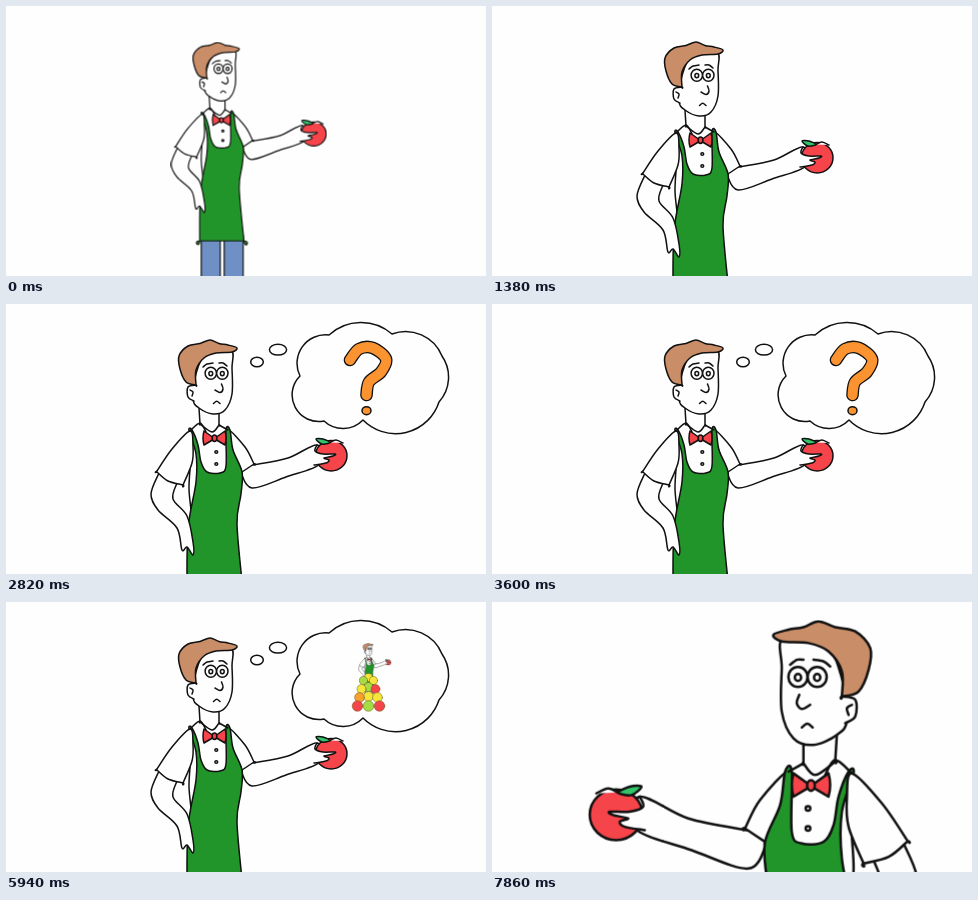
An HTML page for the animation above (8 s loop, 480 px wide and 270 px high).

```html
<!DOCTYPE html>
<html lang="en">
<head>
<meta charset="utf-8">
<title>Grocer thinking</title>
<style>
  html, body { margin: 0; width: 100%; height: 100%; overflow: hidden; background: #fdfefd; }
  svg { display: block; width: 100vw; height: 100vh; }
  #zoom { animation: zoom 8s infinite; }
  #wide { animation: hide 8s step-end infinite; }
  #close { animation: reveal 8s step-end infinite; }

  @keyframes zoom {
    0% { transform: translate(50.6px, 7.9px) scale(.7905); animation-timing-function: cubic-bezier(.3, .3, .5, 1); }
    8.75%, 100% { transform: translate(0px, 0px) scale(1); }
  }
  @keyframes hide { 0% { opacity: 1 } 91.5%, 100% { opacity: 0 } }
  @keyframes reveal { 0% { opacity: 0 } 91.5%, 100% { opacity: 1 } }
</style>
</head>
<body>
<svg viewBox="0 0 480 270" stroke="#111" stroke-width="1.5" stroke-linecap="round" stroke-linejoin="round" fill="none">
  <defs><g id="man"></g></defs>
  <g id="wide">
    <g id="zoom"><use href="#man"/></g>
    <g id="thought"></g>
  </g>
  <g id="close"><use href="#man" transform="matrix(-1.67 0 0 1.67 667.2 -40.8)"/></g>
</svg>
<script>
const LOOP = 8000;
const WHITE = '#fdfefd', GREEN = '#22952a', RED = '#f5444a', HAIR = '#c98d68', JEANS = '#6f90c4';
const ORANGE = '#fb9430', LEAF = '#35c46a';

function add(parent, tag, attrs = {}) {
  const el = document.createElementNS('http://www.w3.org/2000/svg', tag);
  for (const k in attrs) el.setAttribute(k, attrs[k]);
  return parent.appendChild(el);
}

// Smooth curve through "x,y x,y ..."; a doubled point makes a corner.
function curve(text, closed) {
  const p = text.trim().split(/\s+/).map(s => s.split(',').map(Number));
  const n = p.length;
  const at = i => closed ? p[(i + n) % n] : p[Math.max(0, Math.min(n - 1, i))];
  let d = 'M' + p[0];
  for (let i = 0; i < (closed ? n : n - 1); i++) {
    const [a, b, c, e] = [at(i - 1), at(i), at(i + 1), at(i + 2)];
    const c1 = b.map((v, k) => v + (c[k] - a[k]) / 6);
    const c2 = c.map((v, k) => v - (e[k] - b[k]) / 6);
    d += `C${c1} ${c2} ${c}`;
  }
  return d + (closed ? 'Z' : '');
}

const man = document.getElementById('man');
const shape = (pts, fill, more) => add(man, 'path', { d: curve(pts, true), fill, ...more });
const line = (pts, fill = 'none', more) => add(man, 'path', { d: curve(pts), fill, ...more });
const oval = (cx, cy, rx, ry, fill, to = man) => add(to, 'ellipse', { cx, cy, rx, ry, fill });

function drawBody() {
  for (const x of [183, 212])
    add(man, 'path', { d: `M${x} 280 V340 h24 V280`, fill: JEANS });

  add(man, 'path', { d: 'M184 127 L194 119 H213 L222 126 L232 190 L184 205Z', fill: WHITE, stroke: 'none' });
  line('184,165 183,185 185,206');

  // Holding arm and its sleeve
  line('247,161 282,154 311,141 314,160 280,173 246,184 235,169', WHITE);
  shape('222,126 239,143 248,160 248,160 236,168 236,168 228,150', WHITE);

  // Apron
  shape(`183,127 186,126 192,141 195,158 201,168 214,169 220,162 220,126 224,126 227,146 236,168
    235,190 231,220 237,287 237,287 181,287 181,287 182,225 190,178 190,150`, GREEN);

  // Resting arm and its sleeve
  line('153,169 145,190 152,206 171,224 176,246 181,243 187,251 187,238 181,212 167,195 171,179', WHITE);
  shape('184,127 166,145 151,167 151,168 162,177 177,181 177,181 186,159 187,142', WHITE);
}

function drawNeck() {
  line('193,104 194,120 194,120 206,128 213,121 213,121 213,106', WHITE);
  line('184,127 194,119 200,128');
  line('213,121 222,126');
  for (const side of [-1, 1]) {
    const x = 208.5 + side * 2, tip = x + side * 8.5;
    add(man, 'path', { d: `M${x} 133 L${tip} 127 q${side * 2} 7 0 14 L${x} 136Z`, fill: RED });
  }
  oval(208.5, 134.3, 2.3, 3.2, RED);
  for (const y of [148, 160]) oval(210.3, y, 1.4, 1.3, WHITE);
}

function drawHead() {
  shape('190,70 200,50 225,46 226,64 226,90 219,106 207,110 193,104 187,95', WHITE);
  line('190,81 182,83 182,93 188,97', WHITE);
  line('184,86 187,88 186,92');
  shape('231,44 222,41 213,39.5 204,36 194,39.5 182,42 173,52 174,65 180,78 190,81 190,81 190,66 198,54 210,49 226,48', HAIR);
  for (const x of [204.8, 216.3]) {
    oval(x, 69.3, 5.7, 6, WHITE);
    oval(x, 69.6, 1.9, 2.1, WHITE);
  }
  line('197,63 201,60 207,59');
  line('213,59 217,59 221,62');
  line('215.5,80 217,85 214,88.5 209,86');
  line('207.5,99.5 210.7,97.3 214,99.5');
}

function drawApple() {
  oval(325.2, 151.8, 15.8, 15.2, RED);
  line('324,138.5 330,136 337,139', WHITE);
  shape('310,135 317,135 324,138.5 316,140', LEAF);
  const fingers = '311,141 309,147 317,150 329,150 327,152 318,154 323,156 320,159 308,161';
  line(fingers + ' 300,163 300,147', WHITE, { stroke: 'none' });
  line(fingers);
}

drawBody();
drawNeck();
drawHead();
drawApple();

// Group that is visible only between two times of the loop.
function cue(parent, from, to = LOOP) {
  const g = add(parent, 'g');
  g.animate([
    { opacity: 0, offset: 0 },
    { opacity: 1, offset: from / LOOP },
    { opacity: to < LOOP ? 0 : 1, offset: to / LOOP }
  ].map(k => ({ ...k, easing: 'step-end' })), { duration: LOOP, iterations: Infinity });
  return g;
}

const thought = document.getElementById('thought');
oval(251, 58, 6.3, 4.8, WHITE, cue(thought, 1740));
oval(272, 45.7, 8.6, 5.4, WHITE, cue(thought, 1920));

// Cloud: arcs between notches, each with its own bulge.
const notches = [[294, 72, 15], [323, 31, 12], [386, 30, 11], [436, 52, 8], [433, 98, 22], [357, 116, 8], [318, 117, 19]];
let d = 'M294 72';
notches.forEach(([x, y, bulge], i) => {
  const [nx, ny] = notches[(i + 1) % notches.length];
  const half = Math.hypot(nx - x, ny - y) / 2;
  const r = (half * half + bulge * bulge) / (2 * bulge);
  d += `A${r} ${r} 0 0 1 ${nx} ${ny}`;
});
add(cue(thought, 2220), 'path', { d: d + 'Z', fill: WHITE });

// Question mark: a thick stroke with a dark rim.
const ask = cue(thought, 2820, 4500);
const hook = curve('344,56 353,45 367,44 380,55 375,68 363,78 360.5,91');
add(ask, 'path', { d: hook, 'stroke-width': 12.6 });
add(ask, 'path', { d: hook, 'stroke-width': 10, stroke: ORANGE });
oval(360.5, 106.7, 4.5, 4, ORANGE, ask);

// Small grocer behind a pile that grows level by level.
const idea = cue(thought, 4500);
add(idea, 'use', { href: '#man', transform: 'translate(328.6 35.4) scale(.165)', 'stroke-width': 2.2 });
const hues = [RED, '#f7a02c', '#f6e63c', '#a5dc45'];
for (let k = 3; k >= 0; k--) {
  const level = cue(idea, 4500 + 200 * k);
  const r = 5.3 - .4 * k;
  add(level, 'g');
  level.setAttribute('stroke', '#6b5a20');
  level.setAttribute('stroke-width', .5);
  oval(362.5, 104 - 9.5 * k, r, r, hues[k % 2 ? 2 : 3], level);
  for (const side of [-1, 1])
    oval(362.5 + side * (11 - 2 * k), 104 - 8.5 * k, r, r, hues[(k + (side > 0 && k)) % 4], level);
}
</script>
</body>
</html>
```
